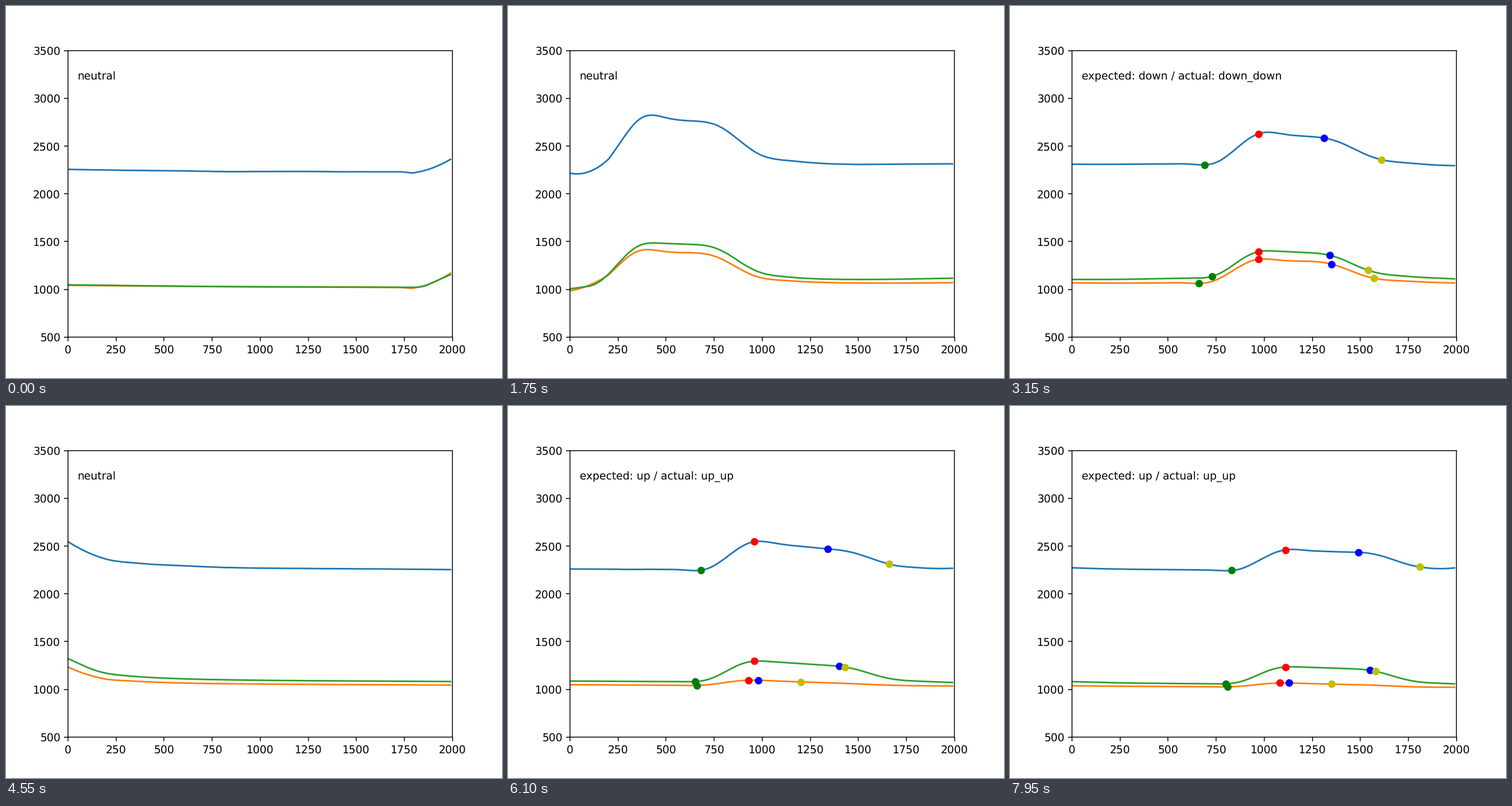
Animation of 864x648 px, one loop 8 s. Source, as a matplotlib script:

```python
import numpy as np
import matplotlib.pyplot as plt
from matplotlib.animation import FuncAnimation

FRAMES, INTERVAL = 160, 50
SHIFT = 5        # samples scrolled per frame
VIEW = 200       # samples on screen
STEP = 10        # x units per sample

plt.rcParams["text.hinting"] = "none"

# Slow drift of the three resting sensors.
DRIFT_AT = [0, 80, 180, 380, 560, 680, 875, 1000]
DRIFT = [
    [2256, 2234, 2230, 2318, 2266, 2254, 2250, 2250],
    [1042, 1028, 1022, 1070, 1053, 1042, 1027, 1018],
    [1047, 1028, 1020, 1118, 1092, 1079, 1056, 1046],
]
LAG = [0.8, -1.5, -0.4]
NOISE = [5, 0.6, 0.6]

# Gesture: start / peak / release / end marks of each sensor around its time.
DOWN = dict(text="expected: down / actual: down_down", rest=0.21,
            marks=np.array([(-16, 12, 46, 76), (-19, 12, 50, 72),
                            (-12, 12, 49, 69)]))
UP = dict(text="expected: up / actual: up_up", rest=0.14,
          marks=np.array([(-14, 14, 52, 84), (-16, 11, 16, 38),
                          (-17, 14, 58, 61)]))

# Gesture, time, hold, heights, share of the height kept until release.
EVENTS = [
    (DOWN, 200, 62, (575, 382, 458), (0.82, 0.86, 0.89)),
    (DOWN, 400, 61, (336, 248, 298), (0.84, 0.88, 0.89)),
    (UP, 692, 74, (300, 58, 231), (0.65, 0.45, 0.73)),
    (UP, 892, 70, (213, 44, 188), (0.83, 0.55, 0.85)),
]


def ease(t, center, width):
    u = np.clip((t - center) / width + 0.5, 0, 1)
    return u * u * (3 - 2 * u)


def pulse(t, hold, keep, rest):
    """Quick rise, sagging plateau, fall to a remainder that fades away."""
    sag = 1 - (1 - keep) * np.clip((t - 10) / (hold - 22), 0, 1)
    fade = rest * np.exp(-np.clip(t - hold - 13, 0, None) / 24)
    fall = ease(t, hold, 26)
    return ease(t, 0, 20) * (sag * (1 - fall) + fade * fall)


def sensor(n, t, rng):
    y = np.interp(t, DRIFT_AT, DRIFT[n]) + rng.normal(0, NOISE[n], len(t))
    for kind, time, hold, heights, keep in EVENTS:
        y += heights[n] * pulse(t - time - LAG[n], hold, keep[n], kind["rest"])
    return y


class PolySmoother:
    """Sliding polynomial fit; both ends follow the outermost fit."""

    def __init__(self, half, order):
        v = np.vander(np.linspace(-1, 1, 2 * half + 1), order + 1)
        self.half, self.fit = half, v @ np.linalg.pinv(v)

    def __call__(self, y):
        n, fit = self.half, self.fit
        w = 2 * n + 1
        return np.concatenate([fit[:n] @ y[:w],
                               np.convolve(y, fit[n], "valid"),
                               fit[n + 1:] @ y[-w:]])


rng = np.random.default_rng(4)
samples = np.arange(SHIFT * (FRAMES - 1) + VIEW)
signals = [sensor(n, samples, rng) for n in range(3)]
smoothers = [PolySmoother(20, 2), PolySmoother(20, 2), PolySmoother(10, 1)]

fig, ax = plt.subplots(figsize=(6.4, 4.8), dpi=135)
ax.set_xlim(0, 2000)
ax.set_ylim(500, 3500)
for spine in ax.spines.values():
    spine.set_snap(False)
xs = np.arange(VIEW) * STEP
lines = [ax.plot([], [])[0] for _ in signals]
dots = [ax.plot([], [], "o", color=c)[0] for c in "grby"]
label = ax.text(50, 3200, "neutral")


def visible_event(start):
    for kind, time, *_ in EVENTS:
        marks = kind["marks"] + time - start
        if marks.min() >= 10 and marks.max() <= 185:
            return kind["text"], marks
    return "neutral", None


def draw(frame):
    start = frame * SHIFT
    curves = [f(s[start:start + VIEW]) for f, s in zip(smoothers, signals)]
    for line, ys in zip(lines, curves):
        line.set_data(xs, ys)
    text, marks = visible_event(start)
    label.set_text(text)
    for k, dot in enumerate(dots):
        if marks is None:
            dot.set_data([], [])
        else:
            at = marks[:, k]
            dot.set_data(at * STEP, [ys[i] for ys, i in zip(curves, at)])
    return [*lines, *dots, label]


anim = FuncAnimation(fig, draw, frames=FRAMES, interval=INTERVAL, repeat=True)
plt.show()
```
